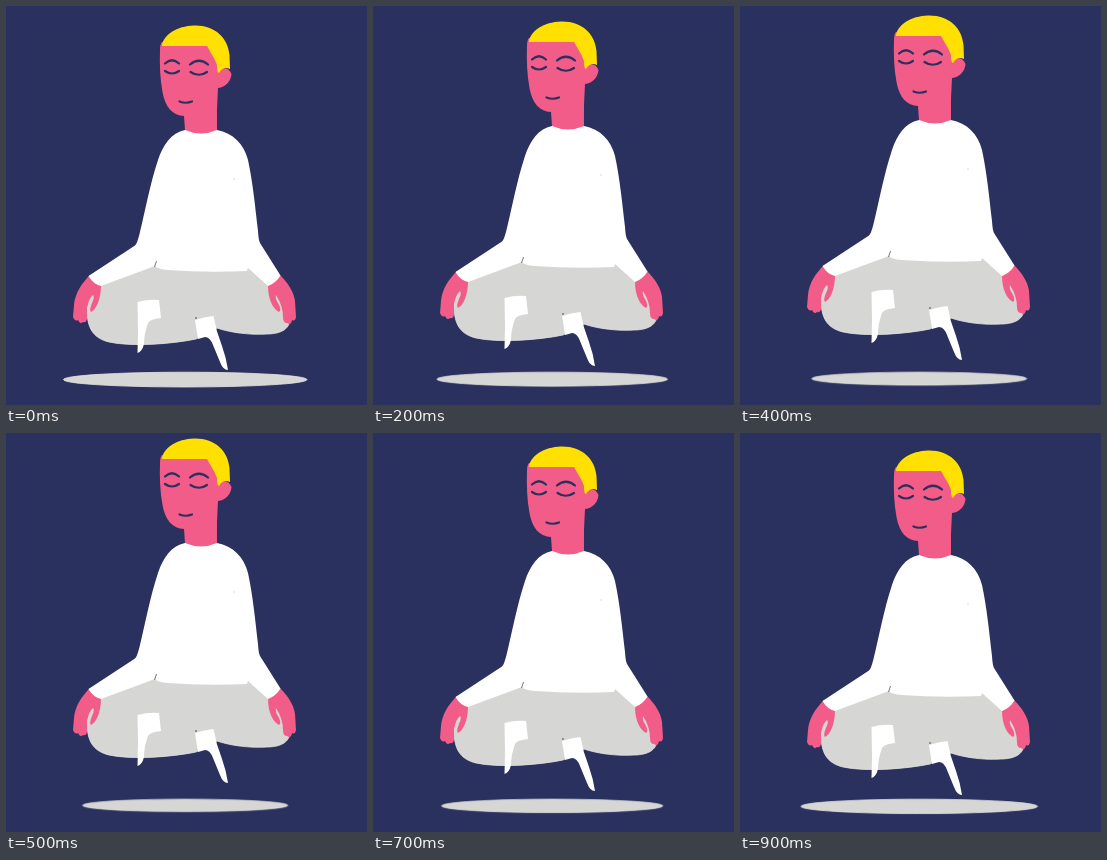
An HTML page for the animation above (1 s loop, 361 by 399 pixels).

```html
<!DOCTYPE html>
<html lang="en">
<head>
<meta charset="utf-8">
<title>Levitating meditation</title>
<style>
  html, body {
    margin: 0;
    width: 100%;
    height: 100%;
    overflow: hidden;
    background: #2a315f;
  }
  svg { display: block; width: 100vw; height: 100vh; }

  .skin { fill: #f25c88; }
  .hair { fill: #ffe000; }
  .legs, .shadow { fill: #d6d6d4; stroke: #e4e4e1; stroke-width: .8; }
  .cloth { fill: #fff; }
  .line { fill: none; stroke: #2a315f; stroke-width: 2.2; stroke-linecap: round; }
  .crease { fill: none; stroke: #777; stroke-width: 1; }
  .speck { fill: #ccc; }

  .body { animation: hover 1s step-end infinite; }
  .shadow { transform-origin: 179.2px 366px; animation: shrink 1s step-end infinite; }

  @keyframes hover {
    0%   { transform: translateY(0); }
    10%  { transform: translateY(-2px); }
    20%  { transform: translateY(-4px); }
    30%  { transform: translateY(-7px); }
    40%  { transform: translateY(-10px); }
    50%  { transform: translateY(-14px); }
    60%  { transform: translateY(-10px); }
    70%  { transform: translateY(-6px); }
    80%  { transform: translateY(-4px); }
    90%  { transform: translateY(-2px); }
  }
  @keyframes shrink {
    0%   { transform: scale(1); }
    10%  { transform: scale(.975); }
    20%  { transform: scale(.946); }
    30%  { transform: scale(.915); }
    40%  { transform: scale(.882); }
    50%  { transform: scale(.842); }
    60%  { transform: scale(.882); }
    70%  { transform: scale(.908); }
    80%  { transform: scale(.94); }
    90%  { transform: scale(.971); }
  }
</style>
</head>
<body>
<svg viewBox="0 0 361 399" preserveAspectRatio="none">
  <ellipse class="shadow" cx="179.2" cy="373.600" rx="121.800" ry="7.400"/>

  <g class="body">
    <path class="legs" d="M150 256 L93 278 C84 282 80 291 81 303 C81 322 87 332 103 336
      C126 341 166 338 190 333 L211 322 C226 327 244 329 261 328
      C276 328 285 322 284 311 C283 296 275 286 262 279 L242 256 Z"/>

    <!-- feet -->
    <path class="cloth" d="M131.500 296 Q142 293 153 294 L155 312 Q144 313 142 317
      Q138 328 138 338 Q136 346 131.500 347 L132 325 Z"/>
    <path class="cloth" d="M189 314 Q198 311 207.500 310 Q210 325 216 340 Q220 351 222 364
      Q217 364 214 356 L207 339 Q204 331 199 331 L192 333 Z"/>
    <circle class="speck" cx="190" cy="312" r="1" style="fill: #777"/>

    <!-- hands -->
    <path class="skin" d="M84 269 C76 277 69 287 68 299 L67 311 Q69 316 72 314
      Q74 319 77 316 Q80 317 81 313 L81 302 Q83 292 87 289 Q89 291 86 297
      Q83 304 85 306 C90 304 95 293 95 280 Z"/>
    <path class="skin" d="M274 269 C282 277 288 286 289 295 L290 311 Q289 316 286 314
      Q285 320 281 317 Q277 317 277 311 Q277 300 270 289 Q269 293 272 297
      Q276 304 273 306 C267 303 262 293 262 280 Z"/>

    <!-- jumper -->
    <path class="cloth" d="M179 124 C165 127 157 139 152 154 C144 178 139 206 133.500 228
      Q131 238 129 239.500 L82.500 270 Q87 278 95 280 L149 260 Q151 263 162 264
      Q200 267 241 265 L242 262 L262 280 Q270 277 274.500 269.500 L254 237
      Q252.500 234 252 225 C249.500 204 247 177 242 154 C238 138 227 127 211 124 Z"/>
    <path class="crease" d="M150.500 255 L148.500 261"/>
    <circle class="speck" cx="228" cy="173" r=".7"/>

    <!-- head -->
    <path class="skin" d="M156 36 Q154 38 154 44 C153.500 58 154 73 156.500 86 C159 101 167 110 178 110
      L179 124 Q195 131 211 124 Q210.500 102 212 82 C220 81 225 75 225.500 68 Q223 61 216 62 L205 32 Z"/>
    <path class="hair" d="M156 40 C157 29 171 20 188 19.500 C209 19 222 32 223.500 49 L224 63
      Q217 60 213 67 Q211 67 211 59 Q209 53 205 47 L201 40 Z"/>
    <path class="line" d="M159 57.500 Q166 51 173 57.500 M159 65 Q166 70 173 65
      M184 58.500 Q193 51 202 58.500 M184.500 66 Q193 71.500 201 66
      M173.500 95.500 Q180 98 186 95.500"/>
  </g>
</svg>
</body>
</html>
```
